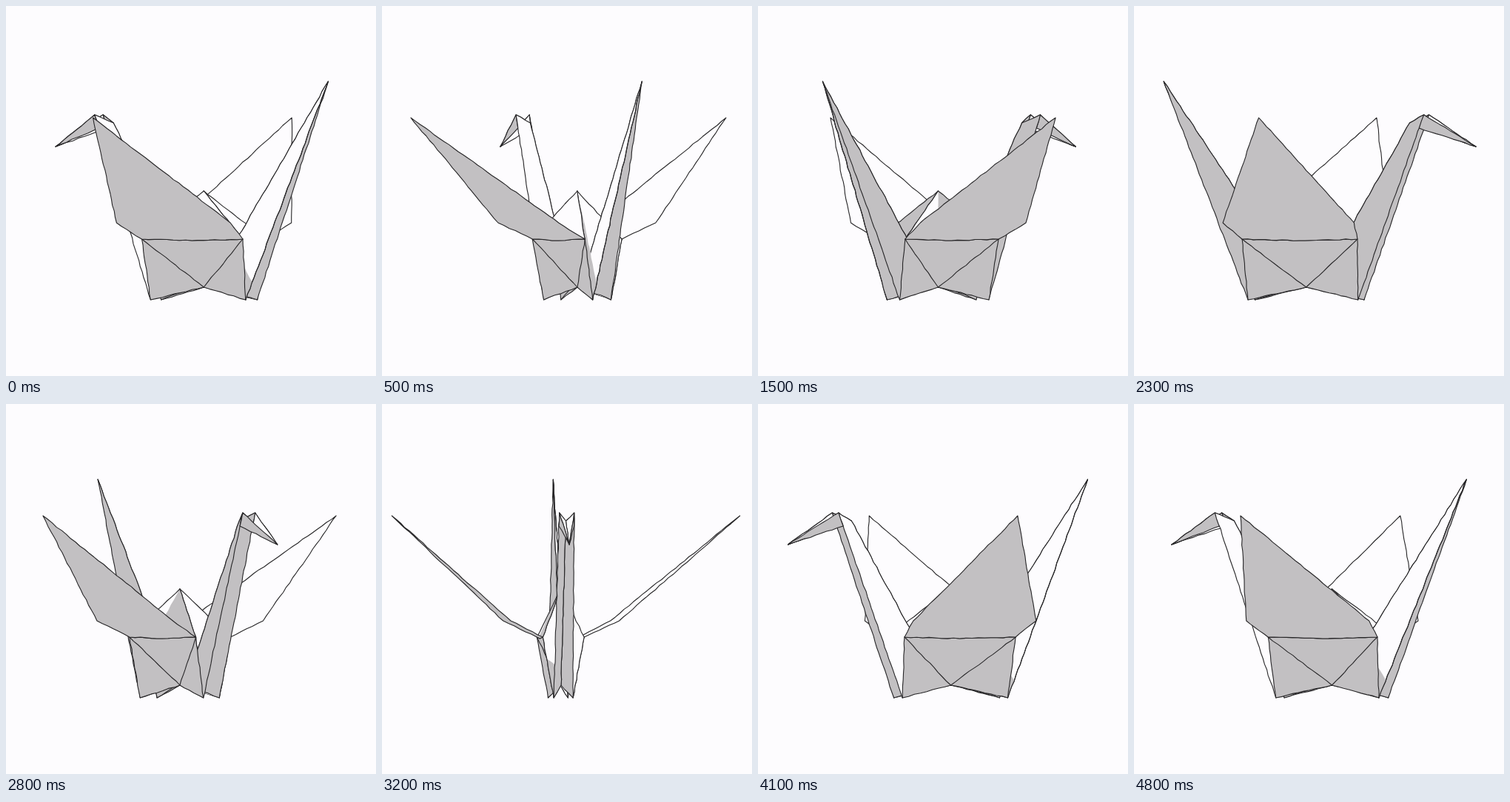
Animation of 500 by 500 pixels, one loop 4900 ms. Source, as an HTML page:

```html
<!DOCTYPE html>
<html lang="en">
<head>
<meta charset="utf-8">
<title>Turning paper crane</title>
<style>
  html, body { margin: 0; width: 100%; height: 100%; overflow: hidden; background: #fdfcfe; }
  svg { display: block; width: 100%; height: 100%; }
  path { stroke-width: 1.1; stroke-linejoin: round; stroke-linecap: round; }
</style>
</head>
<body>
<svg viewBox="0 0 500 500"><g id="crane"></g></svg>
<script>
const crane = document.getElementById('crane');
const WHITE = '#fdfcfe', GREY = '#c2c0c2', INK = '#262527';
const LOOP = 4900, STEPS = 48, RAD = Math.PI / 180;

// Points as [along body, across body, screen y]. Lowercase points exist on sides A and B.
const model = {
  Q: [15.5, -8, 250], X: [15.5, -8, 380], R: [0, -8, 380], S: [24, -8, 380],
  K: [-133, -8, 158], N: [-228, -8, 190], T: [220, -8, 102],
  cA: [-67, 20, 315], cB: [-68, -36, 315],
  dA: [99, 20, 315], dB: [97.5, -36, 315],
  eA: [15.5, 20, 317], eB: [15.5, -36, 317],
  kA: [39, 20, 315], kB: [39, -36, 315],
  fA: [-63, 5, 397], fB: [-63.5, -21, 397],
  gA: [94, 6, 397], gB: [94.5, -21, 397],
  pA: [-76, 67, 293], pB: [-79, -80, 293],
  qA: [109, 64, 293], qB: [109, -81, 293],
  wA: [1, 234, 151], wB: [1.6, -237, 151],
  hA: [-157, 2, 147], hB: [-157, -18, 147]
};
const mix = (a, b, k) => model[a].map((v, i) => v + (model[b][i] - v) * k);
for (const s of 'AB') {
  model['j' + s] = mix('h' + s, 'f' + s, 0.072);
  model['b' + s] = mix('T', 'g' + s, 0.92);
  model['r' + s] = mix('Q', 'b' + s, 0.6);
  model['m' + s] = mix('c' + s, 'f' + s, 0.36);
  model['n' + s] = mix('h' + s, 'f' + s, 0.82);
}

let step, pts, out;

function noise(key, i) {
  let h = 2166136261 ^ (step * 7919 + i * 104729);
  for (const ch of key) h = Math.imul(h ^ ch.charCodeAt(0), 16777619);
  h = Math.imul(h ^ (h >>> 15), 2246822507);
  h ^= h >>> 13;
  return (h >>> 0) / 2147483648 - 1;
}

// Hand-drawn edge: the same wobble whichever way it is walked.
function edge(a, b) {
  if (a > b) return edge(b, a).reverse();
  const [x0, y0] = pts[a], [x1, y1] = pts[b];
  const dx = x1 - x0, dy = y1 - y0, len = Math.hypot(dx, dy) || 1;
  const n = Math.max(1, Math.round(len / 8));
  const list = [];
  for (let i = 0; i <= n; i++) {
    const off = i && i < n ? noise(a + b, i) * 0.55 : 0;
    list.push([x0 + dx * i / n - dy / len * off, y0 + dy * i / n + dx / len * off]);
  }
  return list;
}

const names = (str, side) => [...str].map(c => c > 'Z' ? c + side : c);
const toPath = list => 'M' + list.map(p => p[0].toFixed(1) + ' ' + p[1].toFixed(1)).join('L');

function line(str, side) {
  const [a, b] = names(str, side);
  out += `<path d="${toPath(edge(a, b))}" fill="none" stroke="${INK}"/>`;
}

// Corners run clockwise as seen from side A; the winding tells which side shows.
function facing(str, side) {
  const ring = names(str, side).map(id => pts[id]);
  const area = ring.reduce((sum, p, i) => {
    const q = ring[(i + 1) % ring.length];
    return sum + p[0] * q[1] - q[0] * p[1];
  }, 0);
  return (side === 'A') === (area > 0);
}

function face(str, side, outer, inner = outer, ink = INK) {
  const ids = names(str, side);
  const outline = ids.flatMap((id, i) => edge(id, ids[(i + 1) % ids.length]).slice(0, -1));
  const fill = facing(str, side) ? outer : inner;
  out += `<path d="${toPath(outline)}Z" fill="${fill}" stroke="${ink}"/>`;
}

const patch = (str, side, fill) => face(str, side, fill, fill, 'none');
const plain = side => side === 'A' ? WHITE : GREY;

function wing(s) { face('cpwqde', s, GREY, WHITE); }

function panel(s) {
  face('cedgXf', s, GREY);
  line('cX', s);
  line('dX', s);
}

function tail(order) {
  for (const s of order) {
    face('TgS', s, plain(s), GREY);
    if (s === 'A') {
      patch('rbgd', s, GREY);
      line('Tg', s);
    }
  }
}

function neck(order) { for (const s of order) face('hKRf', s, plain(s), GREY); }
function crown(order) { for (const s of order) face('hKN', s, WHITE); }
function beak(order) { for (const s of order) face('hjN', s, GREY, WHITE); }

function head(order, near, endOn) {
  if (!near || !endOn) crown(order);
  if (!near) beak(order);
  neck(order);
  if (near && endOn) crown(order);
  if (near) beak(order);
}

function hump(order, tailNear) {
  const corner = tailNear ? 'd' : 'c', foot = tailNear ? 'g' : 'f';
  for (const s of order) {
    patch('Q' + corner + foot + 'X', s, WHITE);
    if (tailNear && s === 'A') patch('Qbgd', s, GREY);
    if (!tailNear && s === 'B') patch('mnf', s, GREY);
    line('Q' + corner, s);
    line(corner + foot, s);
  }
  const near = order[1];
  patch('Qdk', near, WHITE);
  patch('Qkc', near, plain(near));
  line('Qd', near);
  line('Qc', near);
}

function stepAt(t) {
  if (t >= 400) return Math.floor(t / 100) - 1;
  return Math.min(2, Math.max(0, Math.floor((t - 50) / 100)));
}

function draw(n) {
  step = n;
  const turn = (55.3 - n * 360 / STEPS) * RAD;
  const sin = Math.sin(turn), cos = Math.cos(turn);
  pts = {};
  for (const id in model) {
    const [u, v, y] = model[id];
    pts[id] = [250 + u * sin - v * cos, y];
  }
  const sides = sin >= 0 ? 'BA' : 'AB';
  const [far, near] = sides;
  const tailNear = cos > 0;
  // Seen end on, the near side panel lies behind the neck or tail.
  const endOn = !facing(tailNear ? 'dgX' : 'cXf', near);
  out = '';
  wing(far);
  panel(far);
  if (tailNear) head(sides, false, endOn); else tail(sides);
  if (endOn) panel(near);
  hump(sides, tailNear);
  if (tailNear) tail(sides); else head(sides, true, endOn);
  if (!endOn) panel(near);
  wing(near);
  crane.innerHTML = out;
}

let shown = -1;
function tick() {
  const n = stepAt(performance.now() % LOOP);
  if (n !== shown) draw(shown = n);
  requestAnimationFrame(tick);
}
tick();
</script>
</body>
</html>
```
